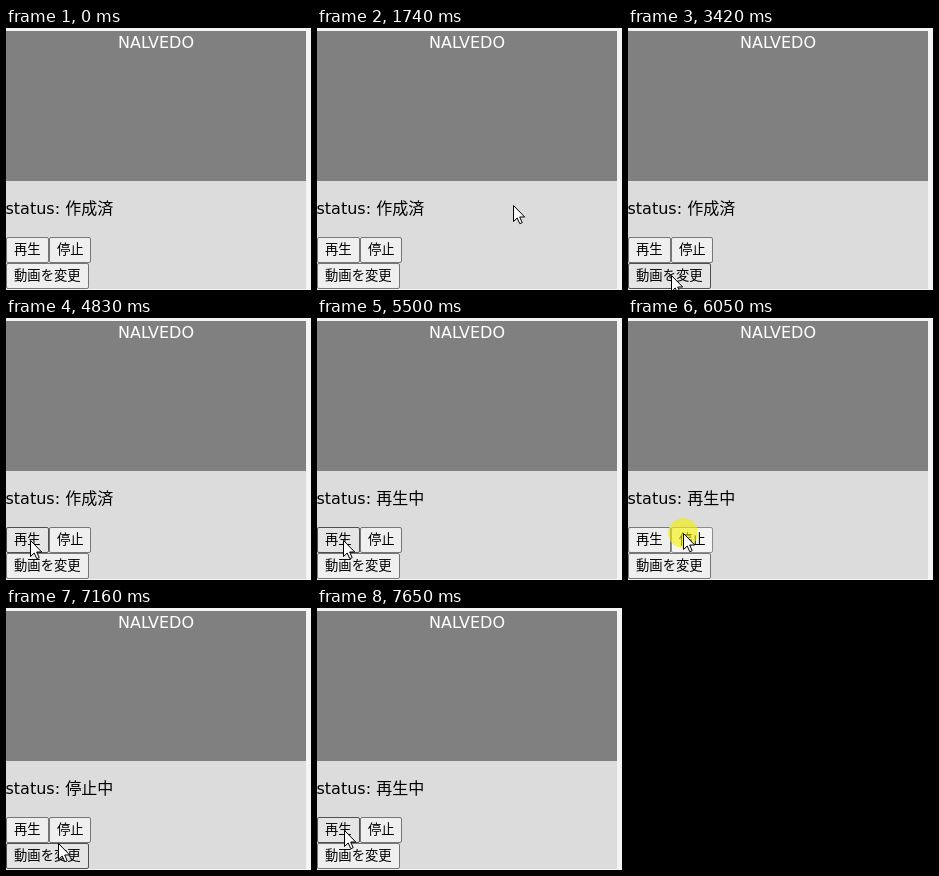
Animation, 305 px wide and 262 px high, one loop 8000 ms. Source, as an HTML page:

```html
<!DOCTYPE html>
<html lang="ja">
<head>
<meta charset="utf-8">
<title>Player demo</title>
<style>
  html, body { margin: 0; width: 100%; height: 100%; overflow: hidden; background: #f4f4f4; }
  svg { display: block; width: 100%; height: 100%; }
  text { font: 16px "DejaVu Sans", "Noto Sans CJK JP", "Noto Sans CJK", sans-serif; }
  .button text { font-size: 13.333px; }
  .button rect { fill: #efefef; stroke: #767676; }
  .hover rect { fill: #e5e5e5; stroke: #4f4f4f; }
  .active rect { fill: #f5f5f5; stroke: #8d8d8d; }
</style>
</head>
<body>
<svg viewBox="0 0 305 262">
  <rect width="305" height="262" fill="#f4f4f4"/>
  <rect y="3" width="300" height="258" fill="#dcdcdc"/>
  <rect y="3" width="300" height="150" fill="#808080"/>
  <text id="title" x="150" y="20" fill="#fff" text-anchor="middle"></text>
  <text id="status" x="-.5" y="186" xml:space="preserve"></text>
  <g id="buttons"></g>
  <circle id="press" r="15" fill="#f5f000" opacity=".6"/>
  <path id="cursor" d="M.5 .5V16.5L4.2 13L6.8 18.7L9.2 17.7L6.7 12H11.7Z" fill="#fff" stroke="#000"/>
</svg>
<script>
const LOOP = 8000, STEP = 70;
const $ = id => document.getElementById(id);

const play = { x: 0, y: 209, w: 43, label: '再生', act: s => { s.status = '再生中'; } };
const stop = { x: 43, y: 209, w: 42, label: '停止', act: s => { s.status = '停止中'; } };
const change = { x: 0, y: 235, w: 83, label: '動画を変更', act: s => { s.local = !s.local; } };
const buttons = [play, stop, change];

// Pointer moves: eased curves from a to b, pulled towards bend
const moves = [
  { start: 1270, end: 1460, a: [254, 236], bend: [236, 190], b: [247, 154] },
  { start: 1740, end: 2370, a: [196, 177], bend: [80, 205], b: [43, 247] },
  { start: 4480, end: 4830, a: [43, 247], bend: [35, 230], b: [24, 222] },
  { start: 5430, end: 5920, a: [24, 222], bend: [40, 220], b: [55, 215] },
  { start: 6600, end: 7440, a: [55, 215], bend: [87, 258], b: [27, 222] }
];

const clicks = [
  { down: 2490, up: 2560, on: change },
  { down: 3290, up: 3420, on: change },
  { down: 4900, up: 4970, on: play },
  { down: 6050, up: 6200, on: stop },
  { down: 7510, up: 7650, on: play }
];

const ease = u => u * u * (3 - 2 * u);

// The pointer is sampled every STEP ms while it moves
function pointer(t) {
  const move = moves.filter(m => m.start <= t).pop();
  if (!move) return [-50, -50];
  const { start, end, a, bend, b } = move;
  const elapsed = Math.floor((t - start) / STEP) * STEP;
  const u = t >= end ? 1 : ease(elapsed / (end - start));
  return a.map((v, k) => Math.round((1 - u) ** 2 * v + 2 * u * (1 - u) * bend[k] + u * u * b[k]));
}

$('buttons').innerHTML = buttons.map(({ x, y, w, label }) =>
  `<g class="button"><rect x="${x + .5}" y="${y + .5}" width="${w - 1}" height="25" rx="1.5"/>` +
  `<text x="${x + 8}" y="${y + 17}">${label}</text></g>`).join('');
const nodes = [...$('buttons').children];

function render(t) {
  const state = { status: '作成済', local: false };
  clicks.filter(c => c.up <= t).forEach(c => c.on.act(state));
  const down = clicks.some(c => t >= c.down && t < c.up);
  const [x, y] = pointer(t);

  $('title').textContent = state.local ? 'LOCAL' : 'NALVEDO';
  $('status').textContent = 'status: ' + state.status;
  $('cursor').setAttribute('transform', `translate(${x} ${y})`);
  $('press').setAttribute('cx', x);
  $('press').setAttribute('cy', y);
  $('press').style.display = down ? '' : 'none';

  buttons.forEach((b, i) => {
    const over = x >= b.x && x < b.x + b.w && y >= b.y && y < b.y + 26;
    nodes[i].setAttribute('class', 'button' + (over ? (down ? ' active' : ' hover') : ''));
  });
}

const begin = performance.now();
function frame() {
  render((performance.now() - begin) % LOOP);
  requestAnimationFrame(frame);
}
frame();
</script>
</body>
</html>
```
